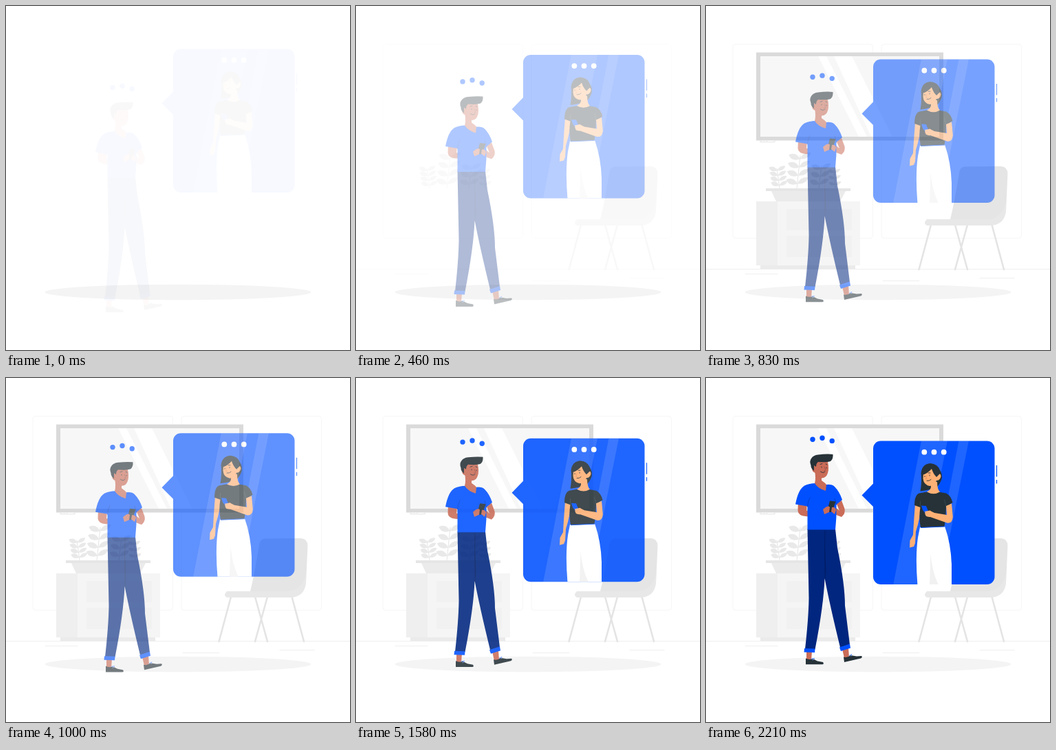
These frames come from a looping animation (500 px wide and 500 px high, 2250 ms). An HTML page:

```html
<!DOCTYPE html>
<html lang="en">
<head>
<meta charset="utf-8">
<title>Chat scene</title>
<style>
  html, body { margin: 0; width: 100%; height: 100%; overflow: hidden; background: #fff; }
  svg { display: block; width: 100vw; height: 100vh; }
  .blue { fill: #0050ff; }
  .dark { fill: #263238; }
  .tan { fill: #ca6c58; }
  .peach { fill: #ffb074; }
  .line { fill: none; stroke-linecap: round; stroke-linejoin: round; }
</style>
</head>
<body>
<svg viewBox="0 0 500 500">
  <defs>
    <clipPath id="card"><rect x="243" y="91.5" width="176.5" height="208.5" rx="11"/></clipPath>
    <clipPath id="glass"><rect id="glassBox"/></clipPath>
  </defs>

  <g id="room">
    <g class="line" stroke="#f6f6f6">
      <rect x="39" y="55.5" width="203.5" height="282" rx="4"/>
      <rect x="255" y="55.5" width="203.5" height="282" rx="4"/>
      <path stroke="#efefef" d="M0 382.5H500M57 389.5H104M398 395.5H448M257 399.5H310"/>
    </g>
    <g id="leaves" fill="#e9e9e9"></g>
    <path class="line" stroke="#e4e4e4" stroke-width="2.6" stroke-linecap="butt"
      d="M327 318L309.500 383M362 318L380 383M380 318L362 383M415.500 318L433 383"/>
    <path fill="#e5e5e5" d="M376 233.500L429 233Q438.500 234 438.500 244L436 298Q434 317 415 319H321Q315 316 321 310H355Q361 286 368 243Q369 234 376 233.500Z"/>
    <path fill="#ededed" d="M325 310H412Q432 307 437 280L436 298Q434 317 415 319H321Q315 316 321 310Z" opacity=".25"/>
  </g>

  <g id="furniture">
    <rect id="tv" fill="#e4e4e4"/>
    <rect id="screen" fill="#f7f7f7"/>
    <g clip-path="url(#glass)"><path id="gleam" fill="#fff" d="M163 73H175L234 190H222ZM186 73H212L271 190H240Z"/></g>
    <path fill="#ededed" d="M77 195H102L100 198.500H79Z"/>
    <path class="line" stroke="#fff" d="M82 196.500H83M86 196.500H87M90 196.500H98"/>
    <path fill="#e6e6e6" d="M87 265H210V269H87Z"/>
    <path fill="#ebebeb" d="M95 269H203L195 284H102Z"/>
    <rect x="79" y="377" width="138" height="5.500" fill="#ebebeb"/>
    <rect x="73" y="284" width="32" height="93" fill="#efefef"/>
    <g id="front">
      <rect x="104" y="284" width="120" height="93" fill="#f5f5f5"/>
      <rect x="117" y="295" width="95" height="31" fill="#f1f1f1"/>
      <rect x="117" y="334" width="95" height="31" fill="#f1f1f1"/>
    </g>
  </g>

  <ellipse cx="250" cy="416" rx="193.500" ry="11.300" fill="#f4f4f4"/>

  <g id="man">
    <g class="blue">
      <circle cx="155" cy="89.300" r="3.700"/><circle cx="169" cy="87.200" r="3.700"/><circle cx="183.200" cy="91.400" r="3.700"/>
    </g>
    <path class="tan" d="M146 397H154L153 410H146ZM198 394L207 392L208 406L201 407Z"/>
    <path class="dark" d="M145 407.500Q150 410 155 408L162 411.500L170 413Q172 416 169 416.300H145ZM200 405.500Q206 407 210 403L219 404.500L226 404Q228 406 225 407.500L201 413Z"/>
    <path class="line" stroke="#6f9cff" d="M153 408L158 407.500L155 410M208 403.500L212 401.500L211 404"/>
    <path fill="#00267f" d="M147.500 219.500H188L191 247Q202 300 202 331L209 387.500L195 391.500Q180 330 172.500 291Q171 330 158.500 394.500L144 394Q149 350 149.500 320Z"/>
    <path class="line" stroke="#001a5c" stroke-width=".7" d="M173 222L172.500 250L174 284M173 252V292"/>
    <path class="blue" d="M143 393L158.500 393.500L158 399L142.500 398.500ZM194 391.500L209 386.500L210 392.500L196 397Z"/>
    <path class="tan" d="M134 178L147 183L146 193L176 189L181 186L185 191L180 197Q160 202 145 201Q134 200 133.500 193ZM189 181L197 178L201.500 190Q203 197 197 202L184 197L182 188L187 187L194 193Z"/>
    <path class="blue" d="M143 156.500Q150 153 159 153Q168 162 175 155Q183 154 187 158Q194 165 198 177L189.500 184Q190 203 188 220.500H147.500V186.500L130 183.500Q134 162 143 156.500Z"/>
    <path class="line" stroke="#003bc0" stroke-width=".8" d="M147.500 187Q148 179 151 174M189.500 184Q188 179 187 175"/>
    <path class="tan" d="M158 135L168 142L168 149Q174 153 175 155L174 164Q163 161 158 153Q160 146 158 135Z"/>
    <path class="dark" d="M180 178.500L188.500 179.500L185 190L182 195H178.500L178 186Z"/>
    <path class="tan" d="M170 191Q178 184 180 188L179 195L172 198ZM183 188Q188 187 189 192L187 198L182 194Z"/>
    <path class="tan" d="M157 122Q168 117 177 122Q179 132 177 138Q175 145 169 145.500Q162 145 159 138Q153 136 154 129Z"/>
    <path class="dark" d="M157 135Q152 131 152.500 127Q150 121 153 117Q156 112 163 111.500Q176 110 184.500 111Q185 118 181 121Q176 123 163 122Q160 124 160 129L157 127Z"/>
    <path class="line dark" stroke="#263238" stroke-width=".9" d="M166 125.500L169 124.500M174 125L176 126M168 129V130M175 130V131M166.500 136Q170 139 173 136"/>
    <path class="line" stroke="#a24e42" stroke-width=".8" d="M172 129L174 134L171.500 134.500"/>
  </g>

  <g id="bubble">
    <rect class="blue" x="243" y="91.5" width="176.5" height="208.5" rx="11"/>
    <path class="blue" d="M243.500 153L226.500 170.500L243.500 187.500ZM421.900 127H423.100V143.500H421.900ZM421.900 148H423.100V153.500H421.900Z"/>
    <g clip-path="url(#card)">
      <path fill="#fff" opacity=".12" d="M313 91H351L309 301H272ZM367.500 91H382L340 301H327Z"/>
      <g fill="#fff">
        <circle cx="317.300" cy="107.700" r="3.900"/><circle cx="331.500" cy="107.700" r="3.900"/><circle cx="345.700" cy="107.700" r="3.900"/>
      </g>
      <path class="dark" d="M311.500 164.500Q314 151 312.500 138Q314 125 326 124Q337 125 340 134Q344 140 342.500 147Q340 154 336 158Q326 163 311.500 164.500Z"/>
      <path class="peach" d="M304 183L312 184Q312 202 305 223L304 240L302 245L296 246.500L296.500 236L301 228Q302 208 304 183Z"/>
      <path fill="#fff" d="M311 217L347 215.500Q356 241 357 271V301H307.500Q304 260 308 232Z"/>
      <path fill="#f1f1f1" d="M326.500 255Q328 280 338 301H325Z"/>
      <path class="dark" d="M321 165.500Q330 170 338 165.500L349 167.500Q356 171 358.500 181L349 187Q349 202 346.500 216L312 217.500Q309 202 311.500 188L303 185Q303 170 310 167.500Z"/>
      <path class="line" stroke="#0050ff" d="M312.500 217.500L346.500 216"/>
      <path class="line" stroke="#41535c" stroke-width=".6" d="M311.500 187V179M349 187L346.500 177"/>
      <path class="peach" d="M349 186L357 182.500L358.800 202Q358 212 350 210.500L326 202Q318 203 318 194L326 193L332 196L350 199Z"/>
      <path class="blue" d="M313 185.500L320 186L323 193.500L319 197L315 192Z"/>
      <path class="peach" d="M318 194L326 192.500L328 200L320 201Z"/>
      <path class="peach" d="M327 150L336 151Q336 162 340 165.500Q331 171 321 165.500Q327 162 327 158Z"/>
      <path class="peach" d="M316 138Q323 136 328 131Q332 138 336 140Q341 137 341.500 143Q340 149 335 149Q332 157 325 157Q316 155 315.500 146Z"/>
      <path class="dark" d="M314 141Q316 129 328 127Q339 131 340 139L335 144Q330 139 328 132Q322 139 314 141Z"/>
      <path class="line" stroke="#263238" stroke-width=".9" d="M316 139.500L319 138.500M323 138L326 138M318 142.500V143.500M325 141V142M321 149.500Q325 150 327 147.500"/>
      <path class="line" stroke="#e88e56" stroke-width=".8" d="M321 142L319.500 147L321.500 147"/>
    </g>
  </g>
</svg>
<script>
const LOOP = 2250, FRAME = 1000 / 24, TRAVEL = 30;
const $ = id => document.getElementById(id);
const clamp = v => Math.min(1, Math.max(0, v));
const mix = (a, b, p) => a + (b - a) * p;

// Leaf pairs along each stem: base x, base y, top x, top y, pairs, leaf length.
const stems = [
  [107, 265, 103, 236, 4, 12],
  [132, 265, 137, 217, 4, 16],
  [164, 265, 168, 232, 3, 14],
  [188, 265, 186, 238, 3, 9]
];
let plant = "";
for (const [x0, y0, x1, y1, n, len] of stems) {
  plant += `<path d="M${x0} ${y0}L${x1} ${y1}" fill="none" stroke="#e4e4e4"/>`;
  for (let i = 0; i < n; i++) {
    const p = (i + .55) / n, x = mix(x0, x1, p), y = mix(y0, y1, p);
    for (const side of [-1, 1]) {
      const dx = side * len, h = len * .38;
      plant += `<path d="M${x} ${y}q${dx * .3} ${-h * 1.8} ${dx} ${side < 0 ? -h : -h * 1.5}q${-dx * .2} ${h * 1.7} ${-dx} ${side < 0 ? h : h * 1.5}"/>`;
    }
  }
}
$("leaves").innerHTML = plant;

// cubic-bezier(0, 0, .58, 1)
function easeOut(x) {
  let lo = 0, hi = 1;
  for (let i = 0; i < 24; i++) {
    const s = (lo + hi) / 2;
    if (1.74 * (1 - s) * s * s + s ** 3 < x) lo = s; else hi = s;
  }
  return 3 * (1 - lo) * lo * lo + lo ** 3;
}

function setBox(el, from, to, p) {
  ["x", "y", "width", "height"].forEach((key, i) => el.setAttribute(key, mix(from[i], to[i], p)));
}

function slide(el, y, opacity) {
  el.setAttribute("transform", `translate(0 ${y})`);
  el.setAttribute("opacity", opacity);
}

function draw(time) {
  const step = Math.max(1, Math.min(53, Math.floor(time / FRAME + .15)));
  const t = step * FRAME, shown = easeOut(step / 54), rest = (1 - shown) * TRAVEL;
  slide($("man"), rest, shown);
  slide($("bubble"), -rest, shown);

  $("room").setAttribute("opacity", clamp((t - 420) / 160));
  $("furniture").setAttribute("opacity", t > 620 ? 1 : 0);
  const settle = easeOut(clamp((t - 667) / 170));
  const glass = [[73, 67, 237, 106], [79, 73, 260, 117], settle];
  setBox($("tv"), [77, 70, 262, 123], [73, 67.5, 272, 128], settle);
  setBox($("screen"), ...glass);
  setBox($("glassBox"), [77, 80, 262, 103], [79, 73, 260, 117], settle);
  $("tv").setAttribute("fill", settle < 1 ? "#dadada" : "#e4e4e4");
  $("gleam").setAttribute("transform", `translate(${6 * (1 - settle)} ${8 * (1 - settle)})`);
  $("front").setAttribute("transform", `translate(${4.5 * (1 - settle)} ${10 * (1 - settle)})`);
}

const start = performance.now();
function tick() {
  draw((performance.now() - start) % LOOP);
  requestAnimationFrame(tick);
}
tick();
</script>
</body>
</html>
```
